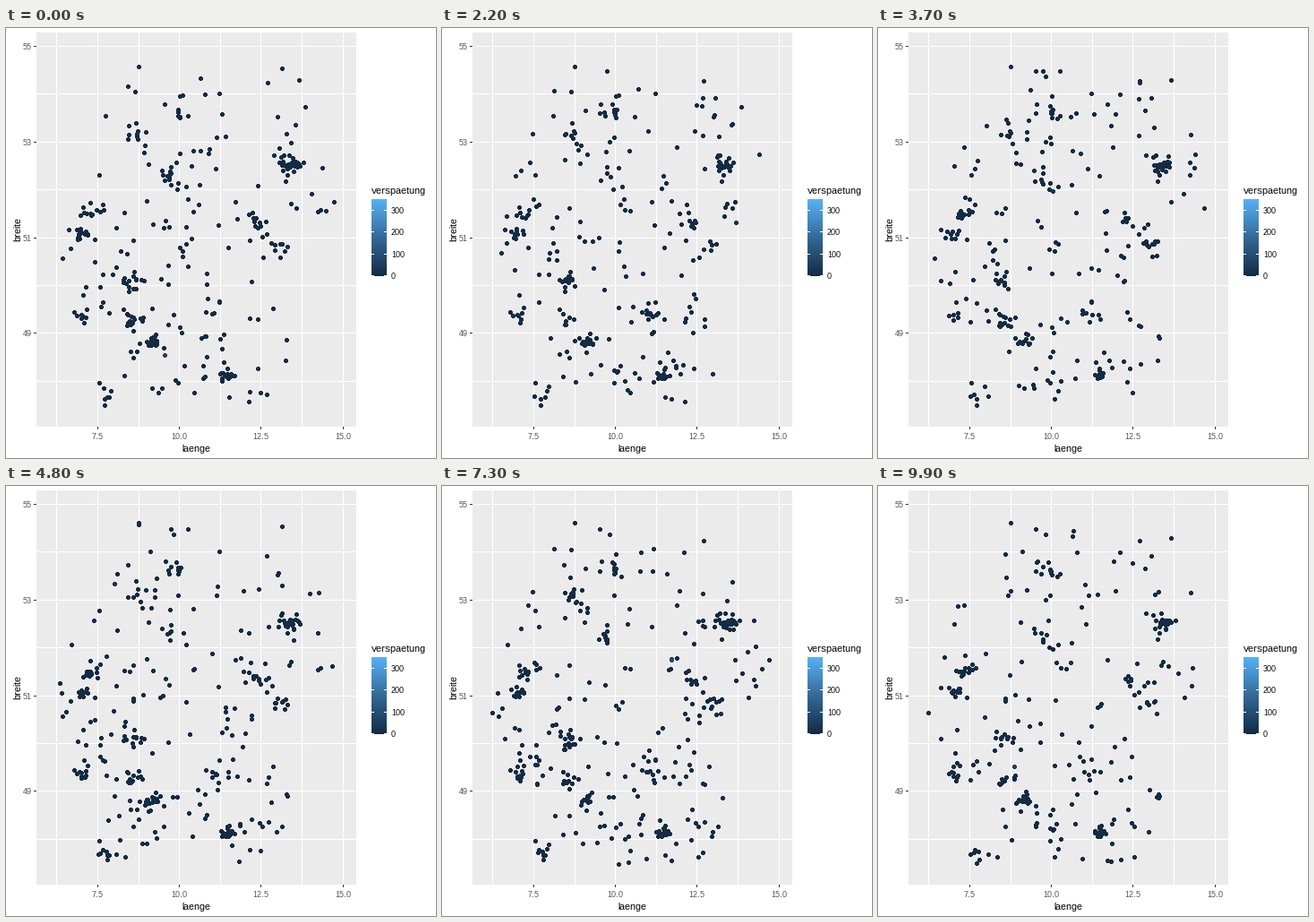
Animation of 480x480 px, one loop 10000 ms. Source, as a matplotlib script:

```python
import matplotlib.pyplot as plt
import numpy as np
from matplotlib.animation import FuncAnimation
from matplotlib.colors import LinearSegmentedColormap
from matplotlib.patches import Rectangle
from matplotlib.path import Path

SIZE, DPI = 480, 100
FRAMES, INTERVAL = 100, 100
PT = 72 / DPI
DELAY_MAX = 350
plt.rcParams.update({
    "font.family": ["Liberation Sans", "DejaVu Sans"],
    "text.hinting": "native",
    "text.hinting_factor": 1,
})
BLUES = LinearSegmentedColormap.from_list(
    "delay", ["#132B43", "#336A98", "#56B1F7"])

# Rail hubs (longitude, latitude), busiest first
HUBS = [
    (13.4, 52.5), (9.2, 48.8), (11.5, 48.15), (8.6, 50.1),
    (10.0, 53.6), (8.5, 49.2), (7.0, 51.1), (7.3, 51.5),
    (12.4, 51.3), (11.1, 49.4), (9.7, 52.3), (13.0, 50.85),
    (8.7, 53.1), (7.1, 49.3), (7.7, 47.7),
]
BORDER = [
    (8.9, 54.9), (11.0, 54.4), (13.6, 54.6), (14.2, 53.5), (14.9, 51.2),
    (12.2, 50.2), (13.5, 48.9), (12.9, 47.6), (10.3, 47.4), (7.5, 47.6),
    (8.0, 48.9), (6.5, 49.4), (6.1, 50.9), (7.3, 53.3),
]


def to_x(lon):
    return 102 + 36.5 * (lon - 7.5)


def to_y(lat):
    return 19.75 + 53.45 * (55 - lat)


def box(x, y, w, h, color, z=1):
    ax.add_patch(Rectangle((x, y), w, h, fc=color, ec="none", lw=0,
                           antialiased=False, zorder=z))


def label(x, y, text, px=9, color="#4D4D4D", ha="center", angle=0):
    ax.text(x, y, text, fontsize=px * PT, color=color, ha=ha, va="baseline",
            rotation=angle, rotation_mode="anchor")


def make_stations(rural=560):
    """Station positions in pixels and the chance that each one is shown."""
    rng = np.random.default_rng(11)
    spots, chance = [], []
    for rank, (lon, lat) in enumerate(HUBS, 1):
        count = int(52 / rank ** 0.5)
        offset = rng.laplace(0, 1, (count, 2)) * (4.5, 3.5)
        spots.append(offset + (to_x(lon), to_y(lat)))
        chance.append(np.full(count, 0.5))

    # Rural stops thin out towards the north
    stops = rng.uniform((6, 47.4), (15, 54.9), (3000, 2))
    keep = rng.random(len(stops)) < 1 - 0.09 * (stops[:, 1] - 47.4)
    stops = stops[keep & Path(BORDER).contains_points(stops)][:rural]
    spots.append(np.column_stack([to_x(stops[:, 0]), to_y(stops[:, 1])]))
    chance.append(np.full(len(stops), 0.29))

    pos = np.clip(np.round(np.vstack(spots)), (50, 26), (374, 424))
    return pos, np.concatenate(chance)


def draw_panel():
    box(34, 5, 357, 440, "#EBEBEB", 0)
    for lon in np.arange(6.25, 15.1, 1.25):
        x = round(to_x(lon))
        box(x, 5, 1, 440, "white")
        if lon % 2.5 == 0:
            box(x, 445, 1, 3, "#333333")
            label(x + 0.5, 459, f"{lon:.1f}")
    for lat in range(48, 56):
        y = round(to_y(lat))
        box(34, y, 357, 1, "white")
        if lat % 2:
            box(31, y, 3, 1, "#333333")
            label(29, y + 4, str(lat), ha="right")
    label(212.5, 473, "laenge", 11, "black")
    label(16, 225, "breite", 11, "black", angle=90)


def draw_legend():
    left, top, width, bottom = 408, 191, 17, 277
    label(left, 185, "verspaetung", 11, "black", "left")
    ramp = np.linspace(1, 0, bottom - top)[:, None]
    ax.imshow(ramp, cmap=BLUES, extent=(left, left + width, bottom, top),
              aspect="auto", interpolation="nearest")
    for value in range(0, 301, 100):
        y = round(276 - 0.244 * value)
        box(left, y, 3, 1, "white")
        box(left + width - 3, y, 3, 1, "white")
        label(430, y + 4, str(value), color="black", ha="left")


fig = plt.figure(figsize=(SIZE / DPI, SIZE / DPI), dpi=DPI, facecolor="white")
ax = fig.add_axes([0, 0, 1, 1])
draw_panel()
draw_legend()
ax.set(xlim=(0, SIZE), ylim=(SIZE, 0))
ax.axis("off")

stations, shown = make_stations()
trains = ax.scatter([], [], s=(4.3 * PT) ** 2, linewidths=0, cmap=BLUES,
                    c=[], vmin=0, vmax=DELAY_MAX, zorder=3,
                    antialiased=False)


def update(i):
    rng = np.random.default_rng(500 + i)
    on = rng.random(len(stations)) < shown * rng.uniform(0.92, 1.08)
    pos = stations[on]
    delay = rng.exponential(3, len(pos))
    late = rng.random(len(pos)) < 0.003
    delay[late] += rng.uniform(60, 180, late.sum())
    trains.set_offsets(pos + 0.5)
    trains.set_array(delay)
    return (trains,)


anim = FuncAnimation(fig, update, frames=FRAMES, interval=INTERVAL,
                     repeat=True, repeat_delay=0)
plt.show()
```
